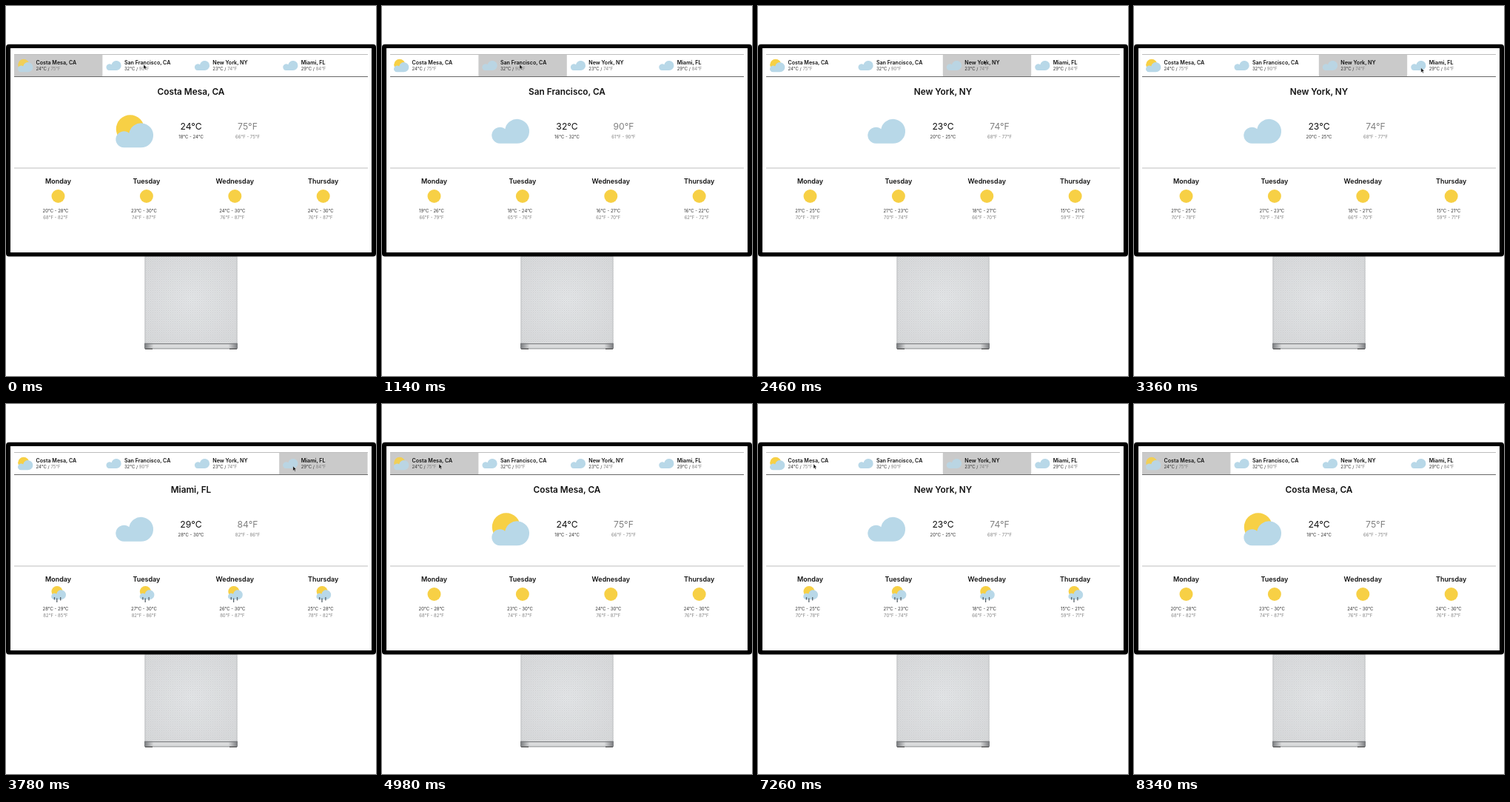
Write an HTML page that moves like this. It is 500 by 500 pixels and loops after 8460 ms.

```html
<!DOCTYPE html>
<html lang="en">
<head>
<meta charset="utf-8">
<title>Weather on a desktop display</title>
<style>
  html, body { margin: 0; width: 100%; height: 100%; overflow: hidden; background: #fff; }
  svg { display: block; width: 100vw; height: 100vh; }
  text { font-family: Inter, "Open Sans", sans-serif; fill: #111; }
  .mid { text-anchor: middle; }
  .bold { font-weight: 600; }
  .big { font-size: 12.2px; }
  .small { font-size: 6px; fill: #333; }
  .gray { fill: #808080; }
</style>
</head>
<body>
<svg viewBox="0 0 500 500">
  <defs>
    <path id="cloudy" fill="#b8d8e8" d="M-14 16.5 A11 11 0 1 1 -7 -3 A16.5 16.5 0 1 1 9 16.5Z"/>
    <circle id="sun" r="9" fill="#f7d045"/>
    <g id="partly">
      <circle cx="-5.5" cy="-3" r="19" fill="#f7d045"/>
      <use href="#cloudy" y="5.5"/>
    </g>
    <g id="rain">
      <circle cx="-1.5" cy="-3.5" r="7.5" fill="#f7d045"/>
      <use href="#cloudy" transform="translate(.5 .8) scale(.39)"/>
      <path d="M-5 4v3.5M-1.7 5.5v5.5M3.2 4v4.5" stroke="#5a646c" stroke-width="1.3"/>
    </g>
    <pattern id="mesh" width="3" height="3" patternUnits="userSpaceOnUse">
      <path d="M0 0h1v1h-1zM1.5 1.5h1v1h-1z" fill="#bfc1c3"/>
    </pattern>
    <radialGradient id="metal" r=".75">
      <stop offset="0" stop-color="#e4e6e8"/>
      <stop offset="1" stop-color="#d6d7d9"/>
    </radialGradient>
    <linearGradient id="foot">
      <stop offset="0" stop-color="#77797c"/>
      <stop offset=".1" stop-color="#d9dadb"/>
      <stop offset=".9" stop-color="#d9dadb"/>
      <stop offset="1" stop-color="#77797c"/>
    </linearGradient>
  </defs>

  <rect x="187.5" y="336" width="125" height="120" fill="url(#metal)"/>
  <rect x="187.5" y="336" width="125" height="120" fill="url(#mesh)" opacity=".6"/>
  <path d="M188 339v117M312 339v117" stroke="#bfc1c3"/>
  <rect x="187" y="455.5" width="126" height="8" rx="1" fill="url(#foot)"/>
  <path d="M187 456.5H313" stroke="#77797c"/>
  <path d="M188 463H312" stroke="#909294"/>
  <path d="M188 463.5h10M302 463.5h10" stroke="#444"/>
  <rect y="51.7" width="500" height="286.8" rx="4"/>
  <rect x="6" y="57" width="488" height="276" fill="#fff"/>

  <g id="content"></g>
  <path d="M11 65.5H489M11 219H489" stroke="#bdbdbd"/>
  <path d="M11 95.5H489" stroke="#686868" stroke-width="1.2"/>
  <path id="cursor" d="M0 0V6.3L1.5 5L2.5 7.2L3.5 6.7L2.5 4.6H4.4Z" fill="#111" stroke="#fff" stroke-width=".35"/>
</svg>
<script>
const LOOP = 8460, TAB = 119.4, GLIDE = 900, REST = 180;
const DAYS = ["Monday", "Tuesday", "Wednesday", "Thursday"];

// Forecasts are Fahrenheit ranges: today, then the four days.
const CITIES = [
  { name: "Costa Mesa, CA", sky: "partly", now: 75, forecast: "65.6-75 68-82 74-87 76-87 76-87" },
  { name: "San Francisco, CA", sky: "cloudy", now: 90, forecast: "61-90 66.2-79 65-76 62-70 62-72" },
  { name: "New York, NY", sky: "cloudy", now: 74, forecast: "68-77 70-78 70-74 65.6-70 59-71" },
  { name: "Miami, FL", sky: "cloudy", now: 84, forecast: "82-86 82-85 81.5-86 80-87 78-82" }
];

// Each click picks a city; the pointer glides there and rests shortly before it.
const CLICKS = [
  { at: 0, city: 0, weather: "sun", x: 186, y: 79 },
  { at: 840, city: 1, weather: "sun", x: 186, y: 79 },
  { at: 2460, city: 2, weather: "sun", x: 305, y: 73 },
  { at: 3660, city: 3, weather: "rain", x: 392, y: 84 },
  { at: 4800, city: 0, weather: "sun", x: 77, y: 81 },
  { at: 6240, city: 2, weather: "rain", x: 287, y: 78 },
  { at: 7440, city: 0, weather: "sun", x: 75, y: 81 }
];
const POINTER_EXIT = LOOP - 300;

const celsius = f => Math.floor((f - 32) / 1.8 + 0.28) + "°C";
const fahrenheit = f => Math.round(f) + "°F";
const range = (span, unit) => span.split("-").map(unit).join(" - ");
const text = (x, y, label, cls, size) =>
  `<text x="${x}" y="${y}" class="${cls}"${size ? ` font-size="${size}"` : ""}>${label}</text>`;
const icon = (name, x, y, scale = 1) =>
  `<use href="#${name}" transform="translate(${x} ${y}) scale(${scale})"/>`;

function tab({ name, sky, now }, i, active) {
  const x = 11 + i * TAB;
  const fill = active ? `<rect x="${x}" y="65" width="${TAB}" height="30.5" fill="#cacaca"/>` : "";
  return fill +
    `<g opacity="${active ? 0.85 : 1}">${icon(sky, x + 15, 80.5, 0.4)}</g>` +
    text(x + 29.5, 79.2, name, "bold", 7.1) +
    text(x + 29.5, 87, `${celsius(now)} / <tspan class="gray">${fahrenheit(now)}</tspan>`, "small");
}

function dayColumn(day, i, span, weather) {
  const x = 70.5 + i * TAB;
  return text(x, 239.8, day, "mid bold", 9) + icon(weather, x, 257) +
    text(x - 3.5, 279.2, range(span, celsius), "mid small") +
    text(x - 3.5, 288.2, range(span, fahrenheit), "mid small gray");
}

function page({ city, weather }) {
  const { name, sky, now, forecast } = CITIES[city];
  const [today, ...spans] = forecast.split(" ");
  return CITIES.map((c, i) => tab(c, i, i === city)).join("") +
    text(250, 119.8, name, "mid bold", 11.8) +
    icon(sky, 173.3, 169.3) +
    text(250, 166.8, celsius(now), "mid big") +
    text(326.5, 166.8, fahrenheit(now), "mid big gray") +
    text(250, 179, range(today, celsius), "mid small") +
    text(326.5, 179, range(today, fahrenheit), "mid small gray") +
    DAYS.map((day, i) => dayColumn(day, i, spans[i], weather)).join("");
}

function pointerAt(t, from, to) {
  const arrive = to.at - REST, leave = Math.max(from.at, arrive - GLIDE);
  const u = Math.min(1, Math.max(0, (t - leave) / (arrive - leave)));
  const ease = u * u * (3 - 2 * u);
  return [from.x + (to.x - from.x) * ease, from.y + (to.y - from.y) * ease];
}

const content = document.getElementById("content");
const cursor = document.getElementById("cursor");
const home = { ...CLICKS[0], at: POINTER_EXIT + REST };
let shown;

function draw() {
  const t = performance.now() % LOOP;
  const index = CLICKS.findLastIndex(c => c.at <= t);
  const click = CLICKS[index];
  if (click !== shown) {
    shown = click;
    content.innerHTML = page(click);
  }
  cursor.setAttribute("transform", `translate(${pointerAt(t, click, CLICKS[index + 1] || home)})`);
  cursor.setAttribute("visibility", t < POINTER_EXIT ? "visible" : "hidden");
  requestAnimationFrame(draw);
}
draw();
</script>
</body>
</html>
```
